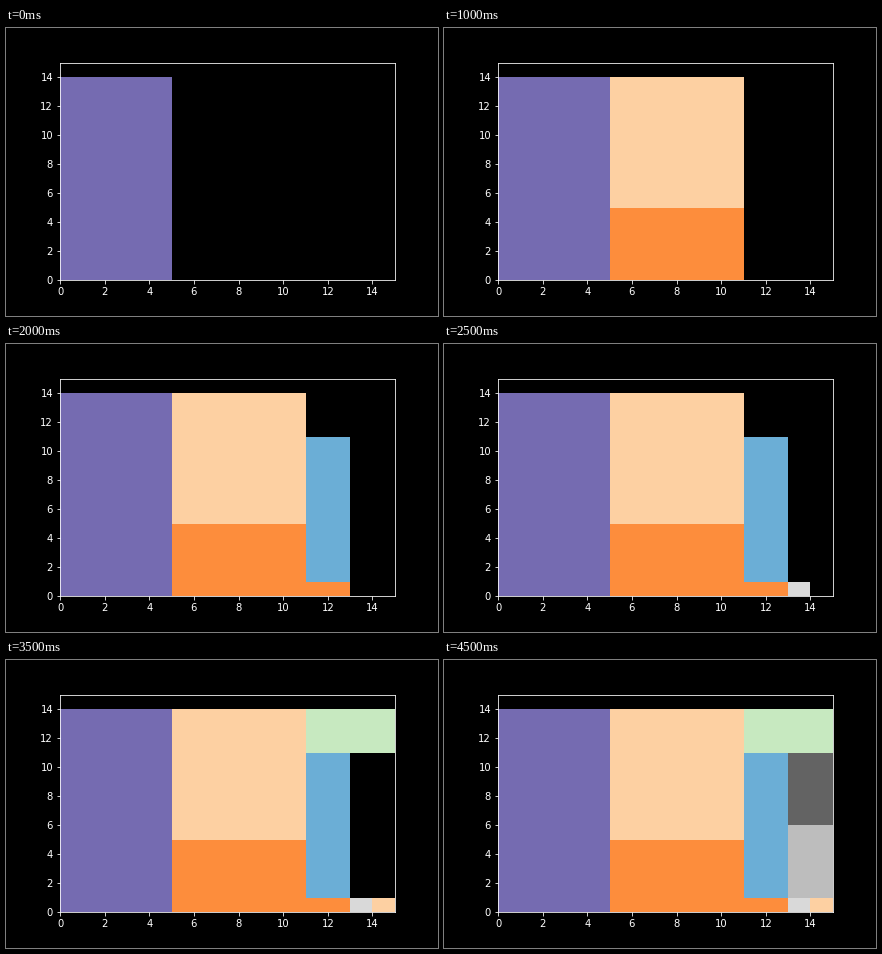
Recreate the animation shown at these times as a matplotlib script. Size 432 px wide and 288 px high, loop 5 s.

```python
import matplotlib.pyplot as plt
from matplotlib.animation import FuncAnimation
from matplotlib.patches import Rectangle

plt.rcParams.update({
    "font.family": "DejaVu Sans",
    "font.size": 10,
    "figure.facecolor": "black",
    "savefig.facecolor": "black",
    "axes.facecolor": "black",
    "axes.edgecolor": "white",
    "xtick.color": "white",
    "ytick.color": "white",
})

PURPLE, ORANGE, PEACH, BLUE = "#756bb1", "#fd8d3c", "#fdd0a2", "#6baed6"
GREEN, PALE, SILVER, GRAY = "#c7e9c0", "#d9d9d9", "#bdbdbd", "#636363"

# x, y, width, height, colour, in order of placement
BLOCKS = [
    (0, 0, 5, 14, PURPLE),
    (5, 0, 6, 5, ORANGE),
    (5, 5, 6, 9, PEACH),
    (11, 0, 2, 1, ORANGE),
    (11, 1, 2, 10, BLUE),
    (13, 0, 1, 1, PALE),
    (14, 0, 1, 1, PEACH),
    (11, 11, 4, 3, GREEN),
    (13, 1, 2, 5, SILVER),
    (13, 6, 2, 5, GRAY),
]

fig, ax = plt.subplots(figsize=(6, 4), dpi=72)
fig.subplots_adjust(left=0.125, right=0.9, bottom=0.125, top=0.88)
ax.set(xlim=(0, 15), ylim=(0, 15),
       xticks=range(0, 15, 2), yticks=range(0, 15, 2))

patches = [ax.add_patch(Rectangle((x, y), w, h, facecolor=color))
           for x, y, w, h, color in BLOCKS]


def update(step):
    for i, patch in enumerate(patches):
        patch.set_visible(i <= step)
    return patches


def reset():
    return update(0)


anim = FuncAnimation(fig, update, frames=len(BLOCKS), init_func=reset,
                     interval=500, repeat=True, repeat_delay=0)
plt.show()
```
